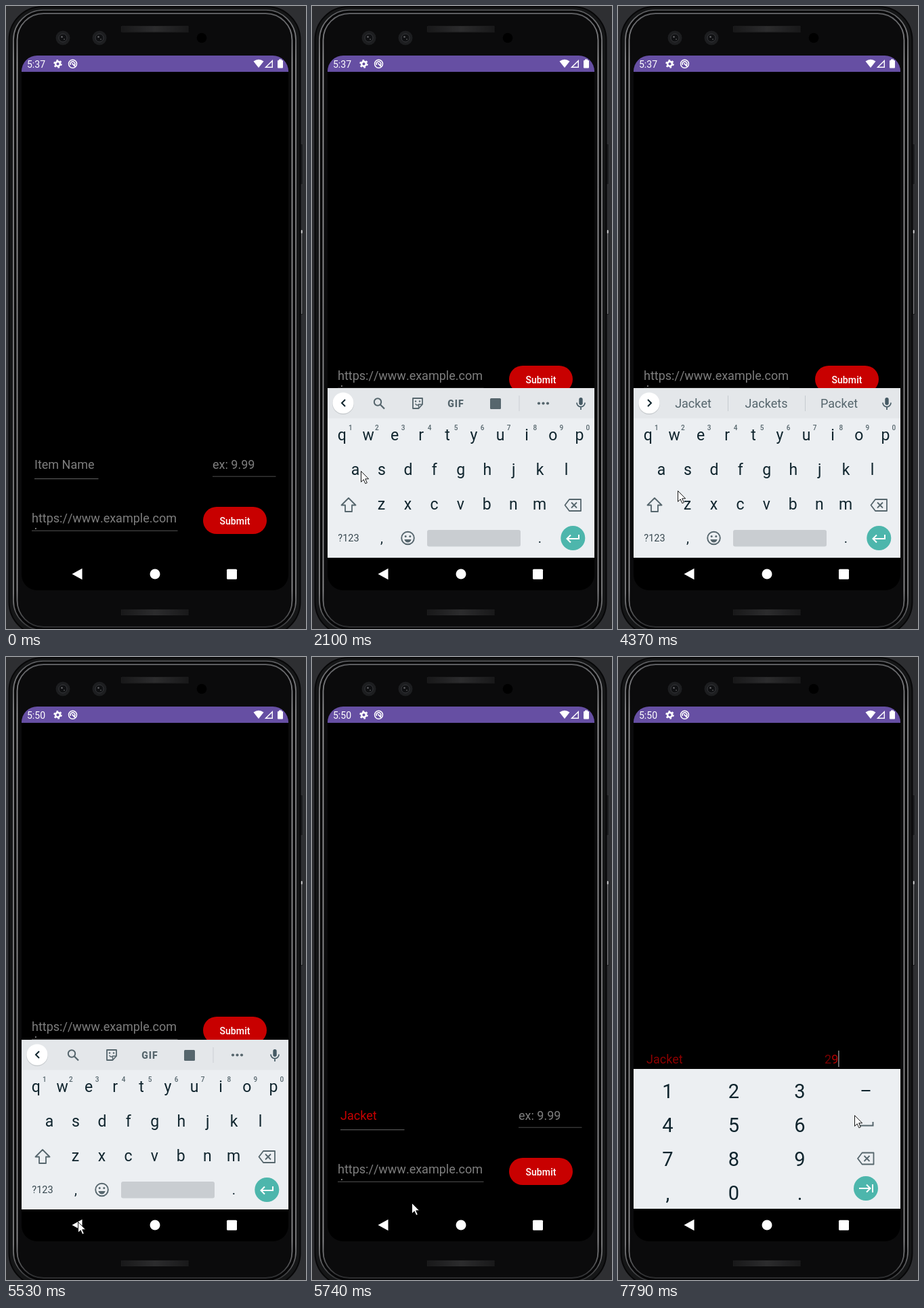
Recreate the animation shown at these times as an HTML page. Size 443x918 px, loop 8 s.

```html
<!DOCTYPE html>
<html lang="en">
<head>
<meta charset="utf-8">
<title>Phone form</title>
<style>
html, body { margin: 0; width: 100%; height: 100%; overflow: hidden; background: #2e2f32; }
svg { display: block; width: 100vw; height: 100vh; }
text { font-family: Roboto, sans-serif; font-kerning: none; white-space: pre; }
</style>
</head>
<body>
<svg id="stage" viewBox="0 0 443 918" preserveAspectRatio="none"></svg>
<script>
const LOOP = 8000;
const INK = '#10252e', SOFT = '#56666d', TEAL = '#4db6ac', HINT = '#7e7e7e';

// Markup helpers
const text = (x, y, s, size, fill, extra = '') =>
  `<text x="${x}" y="${y}" font-size="${size}" fill="${fill}" ${extra}>${s}</text>`;
const mid = (x, y, s, size, fill, extra = '') =>
  text(x, y, s, size, fill, 'text-anchor="middle" ' + extra);
const rect = (x, y, w, h, fill, r = 0, extra = '') =>
  `<rect x="${x}" y="${y}" width="${w}" height="${h}" rx="${r}" fill="${fill}" ${extra}/>`;
const dot = (x, y, r, fill, extra = '') =>
  `<circle cx="${x}" cy="${y}" r="${r}" fill="${fill}" ${extra}/>`;
const line = (d, color, w = 1.8, extra = '') =>
  `<path d="${d}" fill="none" stroke="${color}" stroke-width="${w}" ${extra}/>`;
const fill = (d, color) => `<path d="${d}" fill="${color}"/>`;
const group = (id, body, extra = '') => `<g id="${id}" ${extra}>${body}</g>`;
const at = (x, y, body) => `<g transform="translate(${x} ${y})">${body}</g>`;

const phone = () => {
  const frame = (x, y, h, r, color, sw, body) =>
    rect(x, y, 439 - 2 * x, h, body, r, `stroke="${color}" stroke-width="${sw}"`);
  const lens = x => dot(x, 47, 10.5, '#1d1e20') + dot(x, 47, 6, '#101113', 'stroke="#35363a"') +
    dot(x - 1.5, 45.5, 1.3, '#66676a') + dot(x + 2, 49, 1, '#4a4b4e');
  const mesh = y => rect(170, y, 100, 9, '#141415', 1.5) + rect(170, y, 100, 9, 'url(#mesh)', 1.5) +
    rect(170, y, 100, 9, 'url(#shade)', 1.5);
  return rect(0, 0, 443, 918, '#2e2f32') +
    rect(434, 203, 4.5, 60, '#1b1c1e', 1.5, 'stroke="#3f4043" stroke-width=".6"') +
    rect(434, 330, 4.5, 125, '#1b1c1e', 1.5) + rect(435.8, 331, 1.6, 123, '#77777a', 1) +
    rect(435.5, 330, 2.2, 5, '#d0d0d2', 1) +
    frame(4.5, 1, 926, 49, '#070708', 2, '#151617') +
    frame(11, 6, 914, 44, 'url(#edge)', 1.6, '#060607') +
    frame(16.5, 11, 904, 39, 'url(#edge)', 1.8, '#0b0b0c') +
    lens(84) + lens(138) + dot(289, 47, 7.3, '#000') + mesh(29.5) + mesh(889);
};

const statusBar = () =>
  rect(23, 73, 394, 24, '#664fa3') +
  text(31, 90.5, '', 14, '#fff', 'id="clock"') +
  at(76.5, 85.3, dot(0, 0, 3.4, 'none', 'stroke="#fff" stroke-width="2.6"') +
    dot(0, 0, 5.2, 'none', 'stroke="#fff" stroke-width="2.2" stroke-dasharray="2.6 2.845"')) +
  at(98.5, 85.3, dot(0, 0, 6, 'none', 'stroke="#fff" stroke-width="1.5"') +
    line('M-3 1.5A3.3 3.3 0 1 1 2 2.6', '#fff', 1.5) + line('M-1 -1L3.5 3.8', '#fff', 1.8)) +
  fill('M365.5 81.5Q373 76 380.5 81.5L373 91Z', '#fff') +
  line('M383.5 90.3L393.3 80.7V90.3Z', '#fff', 1.4) +
  rect(401, 80, 8, 11.5, '#fff', 1) + rect(403, 78.5, 4, 2, '#fff');

const form = () =>
  group('fields',
    text(42, 682, 'Item Name', 18, HINT, 'id="item"') +
    rect(42, 696, 94.5, 1.2, '#555', 0, 'id="itemLine"') +
    rect(42, 663, 1.7, 25, '#686878', 0, 'id="itemCaret"') +
    text(305, 681.5, '', 18, HINT, 'id="price"') +
    rect(305, 692.7, 93.5, 1, '#4c4c4c', 0, 'id="priceLine"') +
    rect(305, 663, 1.7, 24, '#777', 0, 'id="priceCaret"')) +
  group('url', text(38, 760.7, 'https://www.example.com', 18, HINT) +
    rect(43, 769, 1.8, 2, HINT) + rect(38, 772.7, 215.5, 1, '#555')) +
  group('submit', rect(291, 738, 94, 40, '#c80000', 20) +
    mid(338, 763.7, 'Submit', 14, '#fff', 'font-weight="500" letter-spacing=".1"'));

const backspace = (x, y) => at(x, y,
  line('M-12 0L-5.5 -8.5H11.5V8.5H-5.5Z', SOFT, 1.8, 'stroke-linejoin="round"') +
  line('M-2.5 -4L5.5 4M5.5 -4L-2.5 4', SOFT));

const letters = () => {
  const row = (chars, x, y) =>
    [...chars].map((c, i) => mid(x + i * 38.95, y, c, 23, INK)).join('');
  const digits = [...'1234567890']
    .map((c, i) => mid(56.8 + i * 38.95, 624.5, c, 10, SOFT, 'font-weight="500"')).join('');
  const tools = group('tools',
    line('M49 580L44 585L49 590', INK, 2) +
    dot(97, 583.5, 5.2, 'none', `stroke="${SOFT}" stroke-width="2"`) + line('M101 587.5L107 593.5', SOFT, 2.2) +
    line('M149 578H163V587L157.5 593H149Z', SOFT, 1.8, 'stroke-linejoin="round"') +
    line('M157.5 593V587H163M152.5 586Q155 589.5 158 587', SOFT, 1.4) +
    dot(153, 582.5, 1.2, SOFT) + dot(159, 582.5, 1.2, SOFT) +
    mid(212.5, 590.5, 'GIF', 14, SOFT, 'font-weight="900" letter-spacing="1"') +
    rect(263, 578, 16, 16, SOFT, 1.5) +
    rect(305.5, 574, 1, 23, '#cbd0d4') +
    [335, 341.5, 348].map(x => dot(x, 585.5, 2.1, SOFT)).join(''));
  const words = group('words',
    line('M44 580L49 585L44 590', INK, 2) +
    [111, 219, 326.5].map((x, i) => mid(x, 592, '', 18, SOFT, `id="word${i}"`)).join('') +
    rect(162, 574, 1, 23, '#c6cbcf') + rect(276, 574, 1, 23, '#c6cbcf'));
  const mic = rect(394.3, 577, 5.4, 11, '#455a64', 2.7) +
    line('M391 584.5A6 6.2 0 0 0 403 584.5M397 591V595', '#455a64', 1.7);
  return rect(23, 563, 394, 250, '#eceff2') + rect(23, 563, 394, 44.5, '#e4e7ea') +
    dot(46, 586, 16, '#c9cdd0') + dot(46, 585, 15.6, '#fff') + tools + words + mic +
    row('qwertyuiop', 44.3, 640) + digits + row('asdfghjkl', 64, 691) + row('zxcvbnm', 102.5, 741.5) +
    line('M54 725L64.5 735.5H59V745H49V735.5H43.5Z', SOFT, 1.8, 'stroke-linejoin="round"') +
    backspace(385.5, 735.5) +
    mid(54, 789, '?123', 14.5, '#37474f') + mid(103, 791, ',', 20, INK) + mid(336.5, 791, '.', 20, INK) +
    dot(141.5, 784, 9.3, 'none', `stroke="${SOFT}" stroke-width="1.9"`) +
    dot(138.2, 781.5, 1.5, SOFT) + dot(144.8, 781.5, 1.5, SOFT) +
    fill('M136.3 786H146.7Q145 790.5 141.5 790.5Q138 790.5 136.3 786Z', SOFT) +
    rect(170, 772, 138, 24.5, '#c9cdd1', 3) +
    dot(385.3, 784, 18, TEAL) +
    line('M394 779V785H377M382 779.5L376.5 785L382 790.5', '#fff', 2);
};

const numpad = () => {
  const keys = [...'123456789,0.'].map((c, i) =>
    mid(73.3 + i % 3 * 97.6, 649.5 + Math.floor(i / 3) * 50.2, c, 29, INK)).join('');
  return rect(23, 607, 394, 206, '#eceff2') + keys +
    rect(359.5, 638, 13, 2, INK) +
    line('M356 685V690.5H376.5V685', SOFT, 2) + backspace(366, 739) +
    dot(366, 783, 18, TEAL) +
    line('M356 783H372M367 777.5L372.5 783L367 788.5M376 777V789', '#fff', 2);
};

const navBar = () => fill('M97.5 837L112.5 828.7V845.3Z', '#fff') + dot(220, 837, 7.5, '#fff') +
  rect(326, 829.7, 15, 15, '#fff', 1.5);

document.getElementById('stage').innerHTML = `<defs>
  <pattern id="mesh" width="2" height="2" patternUnits="userSpaceOnUse">${rect(0, 0, 1, 2, '#38383a') + rect(0, 0, 1, 1, '#505052')}</pattern>
  <linearGradient id="shade"><stop stop-color="#0b0b0c" stop-opacity=".6"/>
    <stop offset=".5" stop-color="#0b0b0c" stop-opacity="0"/><stop offset="1" stop-color="#0b0b0c" stop-opacity=".6"/></linearGradient>
  <linearGradient id="edge" x2="0" y2="1"><stop stop-color="#5c5d60"/><stop offset=".08" stop-color="#9a9a9c"/>
    <stop offset=".5" stop-color="#8b8b8d"/><stop offset=".94" stop-color="#8e8e90"/><stop offset="1" stop-color="#2c2d2f"/></linearGradient>
  <clipPath id="screen">${rect(23, 73, 394, 788, '#000', 23)}</clipPath></defs>` +
  phone() +
  group('display', rect(23, 73, 394, 788, '#000') + statusBar() + form() +
    group('letters', letters()) + group('numpad', numpad()) + navBar(), 'clip-path="url(#screen)"') +
  dot(0, 0, 15, '#ff0', 'id="click" fill-opacity=".47"') +
  group('cursor', '<path d="M-.5 .5V16.3L3.2 12.8L5.8 18.7L8.3 17.6L5.7 11.8H10.6Z" fill="#fff" stroke="#000" stroke-width=".9"/>');

const $ = id => document.getElementById(id);
const show = (id, on) => $(id).setAttribute('visibility', on ? 'inherit' : 'hidden');
const move = (id, x, y) => $(id).setAttribute('transform', `translate(${x} ${y})`);
const set = (id, attrs) => { for (const k in attrs) $(id).setAttribute(k, attrs[k]); };

// Latest row [time, ...values] that has started
const latest = (rows, t) => rows.filter(r => r[0] <= t).pop();

// start, end, positions, from x/y, to x/y, easing
const out = u => 1 - (1 - u) ** 2;
const moves = [
  [680, 1290, 10, 243, 790, 73, 685, out],
  [4370, 4990, 10, 89, 714, 107, 838, out],
  [5530, 5740, 4, 107, 832, 148, 804, u => u * u],
  [5810, 5950, 3, 203, 768, 310, 699, u => u],
  [6020, 6300, 5, 328, 688, 350, 675, out],
];
const clicks = [[1490, 1690, 73, 685], [5190, 5320, 107, 838], [6560, 6760, 350, 675]];

// Vertical offset of each keyboard; null is closed
const letterSlide = [[0, null], [1890, 150], [1960, 60], [2030, 15], [2100, 0],
  [5530, 1], [5600, 40], [5670, 150], [5740, null]];
const numberSlide = [[0, null], [6960, 16], [7030, 5], [7100, 0]];

const hints = [
  [0, '', '', ''],
  [2830, 'J', 'Just', 'Join'],
  [3030, 'Ja', 'Jan', 'Jams'],
  [3160, 'Jac', 'Jack', 'Jacket'],
  [3490, 'Jack', 'Jacks', 'Jacket'],
  [3690, 'Jacke', 'Jacket', 'Jackets'],
  [3820, 'Jacket', 'Jackets', 'Packet'],
];
const prices = [
  [0, 'ex: 9.99', 305],
  [7570, '<tspan fill="#a80000">2</tspan>', 315],
  [7790, '<tspan fill="#780000">2</tspan><tspan fill="#b00000">9</tspan>', 325],
];

function slide(id, rows, t) {
  const y = latest(rows, t)[1];
  show(id, y !== null);
  if (y !== null) move(id, 0, y);
}

function draw(t) {
  const m = latest(moves, t);
  show('cursor', m);
  if (m) {
    const [t0, t1, n, x0, y0, x1, y1, ease] = m;
    const step = Math.min(n - 1, Math.floor((t - t0) / (t1 - t0) * (n - 1) + 0.05));
    const u = ease(step / (n - 1));
    move('cursor', Math.round(x0 + (x1 - x0) * u), Math.round(y0 + (y1 - y0) * u));
  }
  const c = clicks.find(([a, b]) => t >= a && t < b);
  show('click', c);
  if (c) move('click', c[2], c[3]);

  $('clock').textContent = t < 5390 ? '5:37' : '5:50';
  slide('letters', letterSlide, t);
  slide('numpad', numberSlide, t);

  // The form pans up while a keyboard is open
  const typing = t >= 1960 && t < 5600, number = t >= 6960;
  const pan = number ? -83 : 0;
  move('fields', 0, typing ? -83 : pan);
  move('url', 0, typing ? -210 : pan);
  move('submit', 0, typing ? -208 : pan);

  const typed = t >= 2830;
  $('item').textContent = typed ? 'Jacket' : 'Item Name';
  set('item', { fill: !typed ? HINT : number ? '#8c0000' : '#c80000' });
  const itemFocus = t >= 1490 && t < 5390;
  set('itemLine', { height: itemFocus ? 1.8 : 1.2, fill: itemFocus ? '#777' : '#555' });
  show('itemCaret', itemFocus);

  const [, value, caretX] = latest(prices, t);
  if ($('price').innerHTML !== value) $('price').innerHTML = value;
  const priceFocus = t >= 6560;
  set('priceLine', { height: priceFocus ? 1.8 : 1, fill: priceFocus ? '#777' : '#4c4c4c' });
  set('priceCaret', { x: caretX });
  show('priceCaret', priceFocus && (t < 7300 || t >= 7570));

  const words = t >= 2830 && t < 5390;
  show('tools', !words);
  show('words', words);
  latest(hints, t).slice(1).forEach((w, i) => { $('word' + i).textContent = w; });
}

const start = performance.now();
function tick() {
  draw((performance.now() - start) % LOOP);
  requestAnimationFrame(tick);
}
tick();
</script>
</body>
</html>
```
